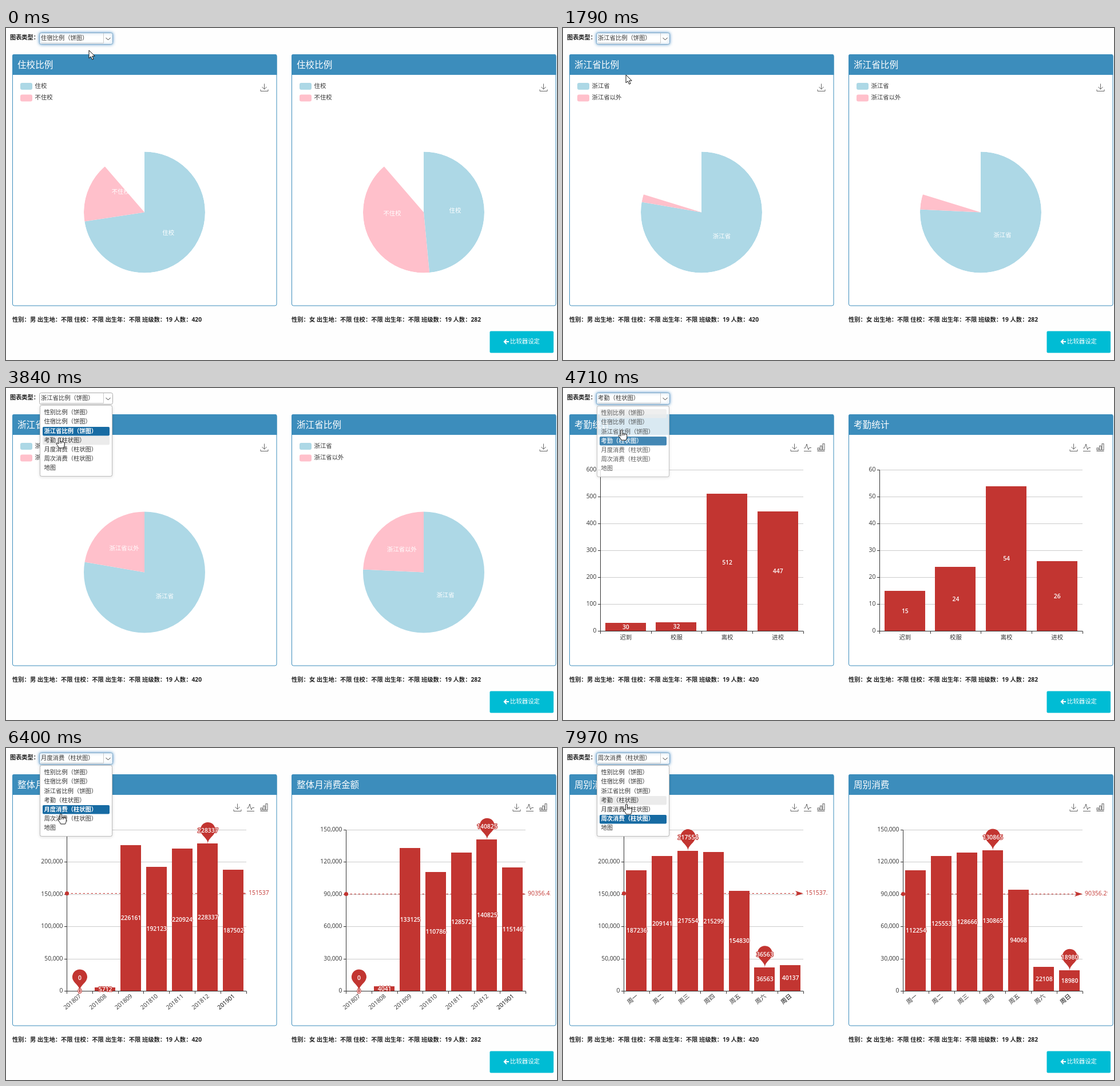
Animation, 963 px wide and 581 px high, one loop 8 s. Source, as an HTML page with a canvas:

```html
<!DOCTYPE html>
<html lang="zh">
<head>
<meta charset="utf-8">
<title>图表比较</title>
<style>
html, body { margin: 0; width: 100%; height: 100%; overflow: hidden; background: #fefefe; }
canvas { display: block; width: 963px; height: 581px; }
</style>
</head>
<body>
<canvas id="stage"></canvas>
<script>
const W = 963, H = 581, LOOP = 8000;
const canvas = document.getElementById('stage');
const dpr = window.devicePixelRatio || 1;
canvas.width = W * dpr;
canvas.height = H * dpr;
const c = canvas.getContext('2d');
// the TC face centres the full-width colon
const FONT = '"Open Sans", "Noto Sans CJK TC", "Noto Sans CJK SC", sans-serif';
const RED = '#c23531', BLUE = '#3c8dbc', INK = '#333', GREY = '#666';
const BASE = 425.5, SPAN = 282, ROW = 16.2;

const months = Array.from({ length: 7 }, (_, i) => 201807 + i + (i > 5 ? 88 : 0));
const days = [...'一二三四五六日'].map(d => '周' + d);
const pies = ['性别比例', '住宿比例', '浙江省比例'].map(s => s + '（饼图）');
const columns = ['考勤', '月度消费', '周次消费'].map(s => s + '（柱状图）');
const options = [...pies, ...columns, '地图'];

const money = { left: 95, max: [250000, 150000], ticks: 5, marks: true };
const charts = [
  { at: -515, title: '住校比例', parts: ['住校', '不住校'], share: [.7257, .485] },
  { at: 1378, title: '浙江省比例', parts: ['浙江省', '浙江省以外'], share: [.777, .7575] },
  { at: 3870, title: '考勤统计', names: ['迟到', '校服', '离校', '进校'], left: 54, max: [600, 60], ticks: 6,
    data: [[30, 32, 512, 447], [15, 24, 54, 26]] },
  { at: 5330, title: '整体月消费金额', names: months, ...money,
    data: [[0, 5712, 226161, 192123, 220924, 228337, 187502], [0, 4041, 133125, 110786, 128572, 140825, 115146]] },
  { at: 6450, title: '周别消费', names: days, ...money,
    data: [[187236, 209141, 217554, 215299, 154830, 36563, 40137], [112254, 125553, 128666, 130865, 94068, 22108, 18980]] }
];

// Each visit: the pointer leaves, opens the list, and comes to rest on an option.
const visits = [
  { leave: 150, open: 440, rest: 820, x: 110, y: 82 },
  { leave: 2500, open: 2850, rest: 3400, x: 93, y: 87 },
  { leave: 3950, open: 4590, rest: 4850, x: 101, y: 104 },
  { leave: 5360, open: 5780, rest: 6250, x: 96, y: 115 },
  { leave: 6500, open: 7440, rest: 7900, x: 111, y: 98 }
];
visits.forEach((v, i) => { v.pick = i + 1 < charts.length ? charts[i + 1].at : LOOP * 2; });

const clamp = v => Math.max(0, Math.min(1, v));
const easeOut = (v, power) => 1 - (1 - clamp(v)) ** power;
const lerp = (a, b, p) => a + (b - a) * p;

function text(s, x, y, o = {}) {
  const size = o.size || 10.4;
  c.font = `${o.weight || 400} ${size}px ${FONT}`;
  c.textAlign = o.align || 'left';
  c.textBaseline = 'alphabetic';
  if (o.outline) {
    c.strokeStyle = o.outline;
    c.lineWidth = 2.2;
    c.lineJoin = 'round';
    c.strokeText(s, x, y + size * .36);
  }
  c.fillStyle = o.color || INK;
  c.fillText(s, x, y + size * .36);
}

function box(x, y, w, h, r, fill, stroke) {
  c.beginPath();
  c.roundRect(x, y, w, h, r);
  if (fill) { c.fillStyle = fill; c.fill(); }
  if (stroke) { c.strokeStyle = stroke; c.lineWidth = 1; c.stroke(); }
}

function line(points, color, width = 1) {
  c.beginPath();
  points.forEach(([x, y]) => c.lineTo(x, y));
  c.strokeStyle = color;
  c.lineWidth = width;
  c.lineJoin = 'miter';
  c.stroke();
}

function saveIcon(x) {
  line([[x, 97.5], [x, 107]], GREY);
  line([[x - 4, 103], [x, 107.3], [x + 4, 103]], GREY);
  line([[x - 6.5, 107.5], [x - 6.5, 110.5], [x + 6.5, 110.5], [x + 6.5, 107.5]], GREY);
}

function chartIcons(x) {
  line([[x - 6.5, 105], [x - 4, 105], [x - 1.5, 98], [x + 1.2, 108], [x + 3, 104.5], [x + 6.5, 104.5]], GREY);
  line([[x - 6.5, 110.5], [x + 6.5, 110.5]], GREY);
  for (let i = 0; i < 3; i++) c.strokeRect(x + 17.5 + i * 4.5, 105 - i * 3.7, 3, 3.5 + i * 3.7);
  line([[x + 17, 110.5], [x + 30, 110.5]], GREY);
}

function panel(x, side, chart) {
  box(x + .5, 46.5, 461.5, 439.5, 3, '#fff', BLUE);
  box(x, 46, 462.5, 36, [3, 3, 0, 0], BLUE);
  text(chart.title, x + 9, 64, { size: 15.6, color: '#fff' });
  const who = side ? ['女', 282] : ['男', 420];
  text(`性别：${who[0]} 出生地：不限 住校：不限 出生年：不限 班级数：19 人数：${who[1]}`, x, 510.5,
    { size: 10.3, weight: 700, color: '#222' });
}

function pie(x, side, chart, t) {
  const colors = ['#add8e6', '#ffc0cb'], cx = x + 231, cy = 322.5, r = 106;
  const share = chart.share[side], turn = 2 * Math.PI;
  chart.parts.forEach((name, i) => {
    box(x + 14, 96 + i * 20.5, 21, 12, 3, colors[i]);
    text(name, x + 39.5, 101 + i * 20.5);
  });
  saveIcon(x + 440.5);
  const sector = (a, b) => {
    c.beginPath();
    c.moveTo(cx, cy);
    c.arc(cx, cy, r, a * turn - turn / 4, b * turn - turn / 4);
    c.closePath();
  };
  c.save();
  const shown = easeOut((t - chart.at) / 1000, 3);
  if (shown < 1) { sector(0, shown); c.clip(); }
  [[0, share], [share, 1]].forEach(([a, b], i) => {
    sector(a, b);
    c.fillStyle = colors[i];
    c.fill();
  });
  [share / 2, (1 + share) / 2].forEach((m, i) => {
    text(chart.parts[i], cx + Math.sin(m * turn) * 55, cy - Math.cos(m * turn) * 55 - .5,
      { color: '#fff', align: 'center', weight: 500 });
  });
  c.restore();
}

function pin(x, y, scale, value) {
  const r = 13 * scale, h = 43.5 * scale, dy = r * r / (h - r || 1), cy = y - h + r + dy;
  const angle = Math.asin(clamp(dy / (r || 1))), dx = Math.cos(angle) * r;
  const tx = Math.sin(angle) * r * .6, ty = Math.cos(angle) * r * .6;
  c.beginPath();
  c.arc(x, cy, r, Math.PI - angle, 2 * Math.PI + angle);
  c.bezierCurveTo(x + dx - tx, cy + dy + ty, x, y - r * .7, x, y);
  c.bezierCurveTo(x, y - r * .7, x - dx + tx, cy + dy + ty, x - dx, cy + dy);
  c.fillStyle = RED;
  c.fill();
  barLabel(value, x, y - 23.5 * scale);
}

function barLabel(value, x, y) {
  text(value, x, y, { color: '#fff', align: 'center', weight: 600, outline: RED });
}

function averageLine(x0, x1, y, label, age) {
  const p = clamp((age - 40) / 1000), end = lerp(x0, x1, p);
  if (!p) return;
  c.setLineDash([3.5, 3.5]);
  line([[x0, y], [end, y]], RED);
  c.setLineDash([]);
  c.beginPath();
  c.arc(x0, y, 3.6 * p, 0, 7);
  c.fillStyle = RED;
  c.fill();
  const s = age < 1100 ? .35 * p : 1;
  c.beginPath();
  [[0, 0], [-14, -4.5], [-10.5, 0], [-14, 4.5]].forEach(([dx, dy]) => c.lineTo(end + dx * s, y + dy * s));
  c.fill();
  text(label, end + 4, y - 1, { color: RED });
}

function bars(x, side, chart, t) {
  const x0 = x + chart.left + .5, x1 = x + 409, data = chart.data[side], max = chart.max[side];
  const step = (x1 - x0) / data.length, age = t - chart.at, grow = easeOut(age / 1000, 3);
  const yOf = v => BASE - v / max * SPAN, mid = i => x0 + step * (i + .5);
  saveIcon(x + 393.5);
  chartIcons(x + 416.5);
  for (let i = 0; i <= chart.ticks; i++) {
    const v = max * i / chart.ticks, y = Math.round(yOf(v) - .5) + .5;
    if (i) line([[x0, y], [x1, y]], '#ccc');
    line([[x0 - 4.5, y], [x0, y]], INK);
    text(v.toLocaleString('en-US'), x0 - 7, y - 1, { align: 'right' });
  }
  c.fillStyle = RED;
  data.forEach((v, i) => {
    const top = Math.round(yOf(v * grow) - .5), left = Math.round(mid(i) - step * .4 - .5);
    c.fillRect(left, top, Math.round(step * .8), BASE - top);
  });
  line([[x0, yOf(max)], [x0, BASE]], INK);
  line([[x0, BASE], [x1, BASE]], INK);
  for (let i = 0; i <= data.length; i++) {
    const tick = Math.round(x0 + step * i - .5) + .5;
    line([[tick, BASE], [tick, BASE + 4.5]], INK);
  }
  chart.names.forEach((name, i) => {
    if (!chart.marks) return text(name, mid(i), 436, { align: 'center' });
    const last = i === data.length - 1;
    c.save();
    c.translate(mid(i) + .5, 432.5);
    c.rotate(-40 * Math.PI / 180);
    text(name, 0, 0, { align: 'right', color: last ? '#000' : INK, weight: last ? 500 : 400 });
    c.restore();
  });
  data.forEach((v, i) => barLabel(v, mid(i), yOf(v * grow / 2) - .5));
  if (!chart.marks) return;
  const mean = data.reduce((a, b) => a + b) / data.length;
  c.save();
  c.beginPath();
  c.rect(x, 83, 452.5, 400);
  c.clip();
  averageLine(x0, x1, Math.floor(yOf(mean)) + .5, +mean.toFixed(2), age);
  [Math.max(...data), Math.min(...data)].forEach(v => pin(mid(data.indexOf(v)), yOf(v), grow, v));
  c.restore();
}

function selectBox(label, glow) {
  text('图表类型：', 7, 16, { size: 10.2, weight: 700, color: '#222' });
  c.save();
  if (glow) { c.shadowColor = 'rgba(70,140,200,.85)'; c.shadowBlur = 5 * dpr; }
  box(58.5, 8.5, 128, 20, 3, '#fff', glow ? '#7fa9c8' : '#aaa');
  c.restore();
  line([[61, 26.5], [170.5, 26.5], [170.5, 9]], '#ccc');
  text(label, 61, 17, { size: 10.3 });
  line([[174.5, 17], [178.5, 21], [182.5, 17]], INK);
}

function optionList(alpha, selected, hover) {
  c.save();
  c.globalAlpha = alpha;
  c.translate(0, Math.round(5 * (1 - alpha)));
  c.save();
  c.shadowColor = 'rgba(0,0,0,.35)';
  c.shadowBlur = 4 * dpr;
  c.shadowOffsetY = dpr;
  box(59.5, 30.5, 126, 124, 3, null, '#bbb');
  c.restore();
  box(59.5, 30.5, 126, 124, 3, '#fff', '#bbb');
  options.forEach((name, i) => {
    const y = 43 + i * ROW, on = i === selected;
    if (on || i === hover) box(64, Math.round(y - 7.5), 117, 15.5, 2, on ? '#176ba3' : '#ebebeb');
    text(name, 66.5, y - .5, { size: 10.3, color: on ? '#fff' : INK, weight: on ? 600 : 400 });
  });
  c.restore();
}

function pointer(x, y, hand) {
  c.save();
  c.translate(x, y);
  c.lineJoin = 'round';
  const shape = new Path2D(hand
    ? 'M-1.5 1Q0 -1 1.5 1V7Q3 5.5 4.3 7.2Q6 6 7 7.8Q9 7 9.3 9V13Q9 15 7.6 18H-.5Q-1.5 15 -5 11Q-5.5 8.8 -3.5 9L-1.5 11Z'
    : 'M0 0V14L3.3 11L5.6 16.3L8 15.3L5.7 10.2H10.2Z');
  c.fillStyle = '#fff';
  c.fill(shape);
  c.strokeStyle = '#111';
  c.lineWidth = 1;
  c.stroke(shape);
  if (hand) [1.5, 4.3].forEach(dx => line([[dx, 7], [dx, 10]], '#111'));
  c.restore();
}

// Ease out to the select box, then from there to each visit's resting place.
function pointerAt(t) {
  let x = 145, y = 39;
  const go = (toX, toY, from, to) => {
    const p = easeOut((t - from) / (to - from), 2);
    x = lerp(x, toX, p);
    y = lerp(y, toY, p);
  };
  visits.forEach(v => {
    go(105, 20, v.leave, v.open - 40);
    go(v.x, v.y, v.open + 30, v.rest);
  });
  return { x, y };
}

function draw(t) {
  c.setTransform(dpr, 0, 0, dpr, 0, 0);
  c.fillStyle = '#fefefe';
  c.fillRect(0, 0, W, H);
  const chart = charts.filter(k => k.at <= t).pop(), selected = charts.indexOf(chart) + 1;
  [11, 499].forEach((x, side) => {
    panel(x, side, chart);
    (chart.parts ? pie : bars)(x, side, chart, t);
  });
  box(845.5, 530.5, 111.5, 38, 2, '#00bcd4');
  line([[879, 549], [871, 549]], '#fff', 2);
  line([[874.8, 545], [870.8, 549], [874.8, 553]], '#fff', 2);
  text('比较器设定', 881, 548.5, { color: '#fff', weight: 500 });

  const focused = t < visits[1].open || t > visits[1].pick;
  selectBox(options[selected], focused);
  const visit = visits.find(v => t >= v.open && t < v.pick + 240);
  const alpha = visit ? Math.min(clamp((t - visit.open) / 150), clamp((visit.pick + 240 - t) / 120)) : 0;
  if (alpha) {
    // the highlight trails the pointer a little
    const row = Math.round((pointerAt(t - 60).y - 43) / ROW);
    optionList(alpha, selected, t < visit.pick ? row : -1);
  }
  const { x, y } = pointerAt(t);
  pointer(x, y, alpha > .3 && y > 30);
}

const start = performance.now();
function tick() {
  draw((performance.now() - start) % LOOP);
  requestAnimationFrame(tick);
}
tick();
</script>
</body>
</html>
```
